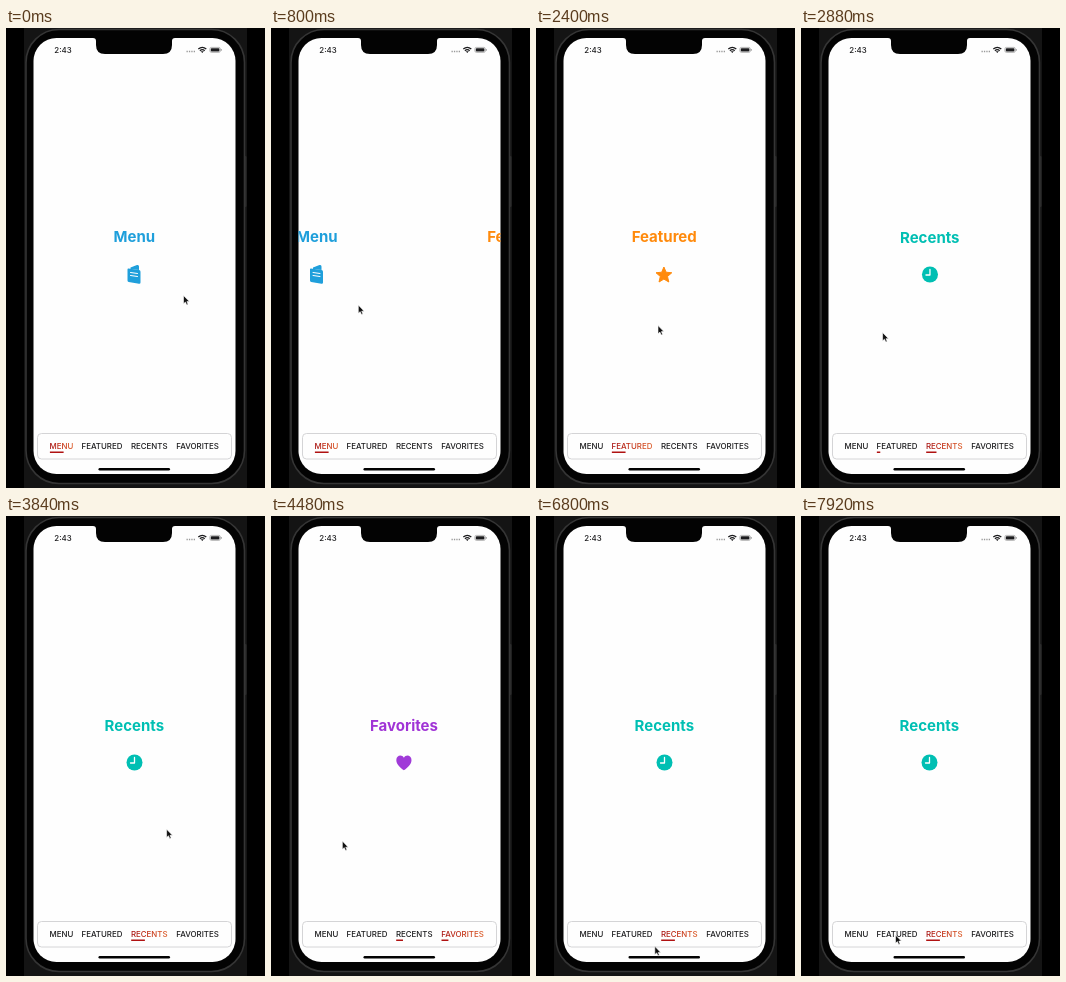
Write an HTML page that moves like this. It is 259 px wide and 460 px high and loops after 8 s.

```html
<!DOCTYPE html>
<html lang="en">
<head>
<meta charset="utf-8">
<title>Swipe tabs</title>
<style>
  html, body { margin: 0; height: 100%; overflow: hidden; background: #000; }
  svg { display: block; width: 100vw; height: 100vh; }
  text { font-family: Inter, Roboto, sans-serif; text-anchor: middle; }
  .small { font-size: 7.9px; font-weight: 500; fill: #1c1c1e; }
  .title { font-size: 15px; font-weight: 700; }
  .line { fill: none; stroke: #fff; stroke-linecap: round; stroke-linejoin: round; }
</style>
</head>
<body>
<svg viewBox="0 0 259 460">
  <defs>
    <clipPath id="screen"><rect x="27.500" y="10" width="202" height="436" rx="23"/></clipPath>
    <linearGradient id="active">
      <stop offset="0" stop-color="#a81414"/>
      <stop offset=".5" stop-color="#c43418"/>
      <stop offset="1" stop-color="#dd5f2c"/>
    </linearGradient>
  </defs>

  <!-- phone body -->
  <rect x="18" width="223" height="460" fill="#141414"/>
  <rect x="238.500" y="128" width="2" height="51" rx="1" fill="#2c2c2c"/>
  <rect x="20" y="1.500" width="218.500" height="454" rx="33" fill="#030303" stroke="#353535" stroke-width="1.600"/>
  <rect x="27.500" y="10" width="202" height="436" rx="23" fill="#fefefe"/>

  <g clip-path="url(#screen)">
    <g id="pages">
      <g fill="#1f9fdb">
        <path d="M124.500 241V239.500L131 237Q133 236.500 133 238.500V242Z"/>
        <path d="M122.500 240.500L133 242Q134.500 242.300 134.500 243.800V254.500Q134.500 256 133 255.800L122.700 254Q121.500 253.800 121.500 252.500V241.500Q121.500 240.300 122.500 240.500Z"/>
        <path class="line" d="M124.500 244.500L131.500 245.500M124.500 247.500L131.500 248.500"/>
      </g>
      <path fill="#ff8a0c" stroke="#ff8a0c" stroke-linejoin="round" id="star"/>
      <g>
        <circle cx="128.500" cy="246.500" r="8" fill="#00bfb3"/>
        <path class="line" stroke-width="1.300" d="M128.500 241.500V247H124.500"/>
      </g>
      <path fill="#a03bd8" d="M128.200 254.300C124 251.500 120.600 248 120.600 244C120.600 239 126.300 238 128.200 241.700C130.100 238 135.800 239 135.800 244C135.800 248 132.400 251.500 128.200 254.300Z"/>
    </g>
  </g>

  <!-- notch and status bar -->
  <path d="M87 9H169V10Q166 10 166 13V17Q166 26 157 26H99Q90 26 90 17V13Q90 10 87 10Z" fill="#030303"/>
  <text class="small" x="57" y="24.500">2:43</text>
  <path d="M180.500 23.500H189" stroke="#999" stroke-width="1.300" stroke-dasharray="1.300 1.100"/>
  <g fill="none" stroke="#1c1c1e" stroke-width="1.300">
    <path d="M192.300 21Q196.300 17.600 200.300 21M193.900 22.700Q196.300 20.600 198.700 22.700"/>
    <path d="M196.300 24.700L195.200 23.500H197.400Z" stroke-width=".5" fill="#1c1c1e"/>
    <rect x="203.900" y="19.400" width="10.400" height="5" rx="1.500" stroke="#888" stroke-width=".6"/>
    <rect x="204.800" y="20.200" width="8.600" height="3.400" rx=".8" fill="#1c1c1e" stroke="none"/>
    <path d="M215.300 21V22.800" stroke="#888" stroke-width=".8"/>
  </g>

  <rect x="31.500" y="405.500" width="194" height="25.500" rx="4" fill="#fefefe" stroke="#d0d0d2" stroke-width=".9"/>
  <g id="tabs"></g>
  <rect x="92.500" y="440" width="71.500" height="2.400" rx="1.200" fill="#030303"/>
  <path id="cursor" d="M0 0V8.300L1.900 6.600L3.200 9.500L4.600 8.900L3.400 6.100H5.900Z" fill="#111" stroke="#fff" stroke-width=".6"/>
</svg>

<script>
const LOOP = 8000, PAGE = 203, TAP = 6320;
const $ = id => document.getElementById(id);

function add(parent, tag, attrs, label = '') {
  const el = document.createElementNS('http://www.w3.org/2000/svg', tag);
  for (const name in attrs) el.setAttribute(name, attrs[name]);
  el.textContent = label;
  return parent.appendChild(el);
}

// Smooth step from 0 to 1
function ease(t, start, duration) {
  const u = Math.max(0, Math.min(1, (t - start) / duration));
  return u * u * (3 - 2 * u);
}

$('star').setAttribute('d', 'M' + Array.from({ length: 10 }, (_, i) => {
  const r = i % 2 ? 3.8 : 8.3, a = i * Math.PI / 5;
  return `${128 + r * Math.sin(a)} ${247.3 - r * Math.cos(a)}`;
}).join('L') + 'Z');

// label, colour, centre of the tab
const tabs = [
  ['Menu', '#1f9fdb', 55.5],
  ['Featured', '#ff8a0c', 96],
  ['Recents', '#00bfb3', 143.2],
  ['Favorites', '#a033d6', 191.5]
].map(([label, fill, x], i) => {
  const page = add($('pages'), 'g', {});
  page.append($('pages').firstElementChild);
  add(page, 'text', { class: 'title', x: 128.3, y: 213.8 + i * 0.5, fill }, label);
  const text = add($('tabs'), 'text', { class: 'small', x, y: 420.8 }, label.toUpperCase());
  const left = x - text.getComputedTextLength() / 2 + 0.3;
  const bar = add($('tabs'), 'rect', { x: left, y: 423.5, height: 1.5, fill: '#b01212' });
  return { page, text, bar };
});

// Each swipe moves on by one page; its tab is picked halfway, and a tap goes back to one tab
const swipes = [[320, 1100], [2395, 500], [4090, 430]];
const picks = [
  [-LOOP, 0],
  ...swipes.map(([start, duration], i) => [start + duration / 2, i + 1]),
  [TAP, 2]
];

// Cursor stops: time, x, y
const stops = [
  [220, 177.5, 267.5], [1040, 64, 279.5], [1900, 172, 289], [2840, 81, 304.5],
  [3700, 170, 312], [4440, 71, 324.5], [5400, 135, 429], [6000, 141.7, 421.5],
  [7400, 104, 436], [7920, 94.5, 419]
];

function cursorAt(t) {
  let [t0, x, y] = stops[0];
  for (const [t1, x1, y1] of stops.slice(1)) {
    const u = ease(t, t0, t1 - t0);
    x += (x1 - x) * u;
    y += (y1 - y) * u;
    t0 = t1;
  }
  return `translate(${x} ${y})`;
}

function draw(t) {
  const n = picks.findLastIndex(([time]) => time <= t);
  const [since, current] = picks[n];
  const previous = picks[n - 1]?.[1];
  const grow = ease(t, since, 350);
  const offset = t < TAP ? swipes.reduce((sum, swipe) => sum + ease(t, ...swipe), 0) : current;

  tabs.forEach(({ page, text, bar }, i) => {
    page.setAttribute('transform', `translate(${(i - offset) * PAGE} 0)`);
    text.style.fill = i === current ? 'url(#active)' : '';
    bar.setAttribute('width', 13.7 * (i === current ? grow : i === previous ? 1 - grow : 0));
  });
  $('cursor').setAttribute('transform', cursorAt(t));
}

const start = performance.now();
function tick() {
  draw((performance.now() - start) % LOOP);
  requestAnimationFrame(tick);
}
tick();
</script>
</body>
</html>
```
